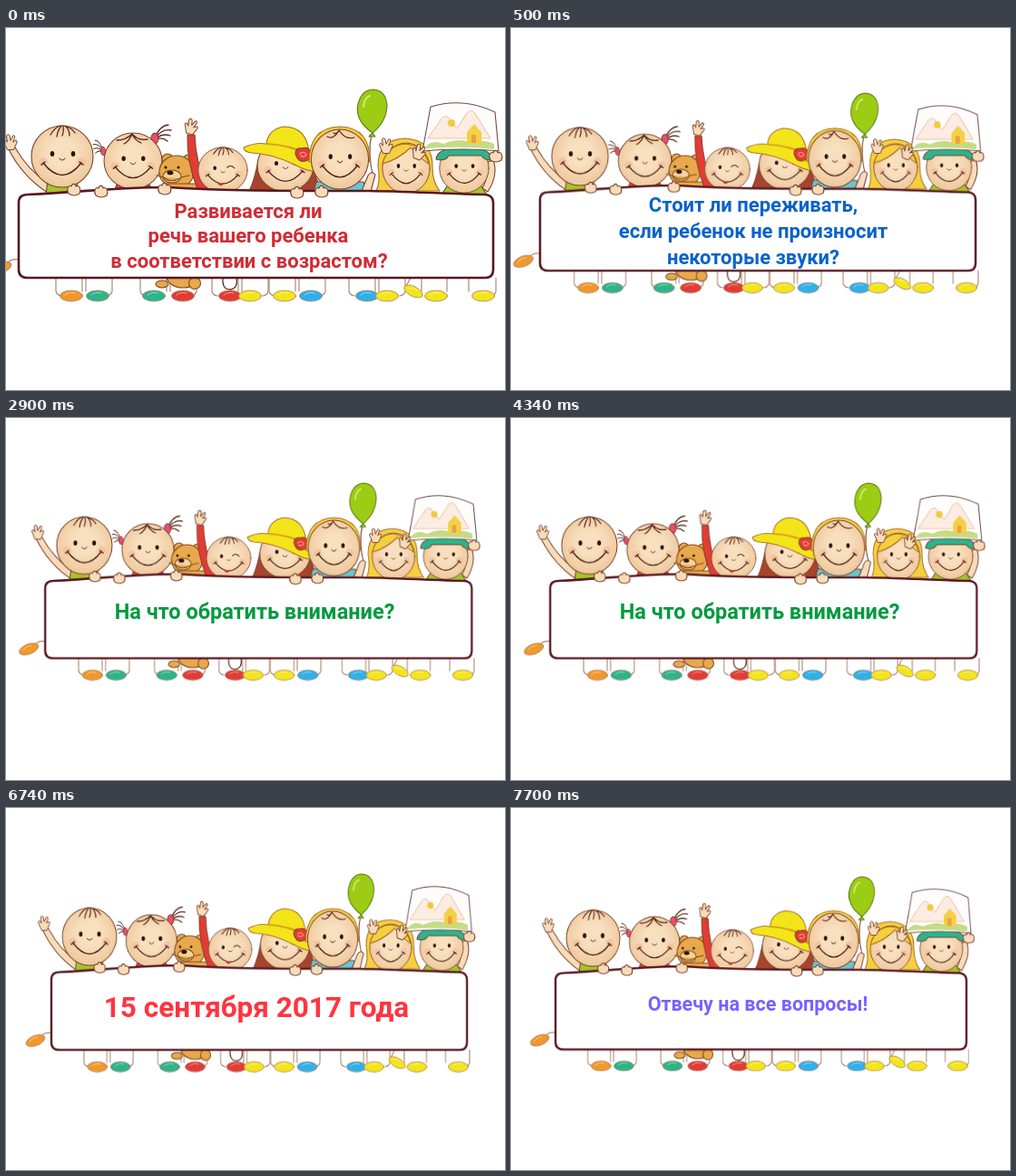
An HTML page without scripts for the animation above (8000 ms loop, 550 px wide and 400 px high).

```html
<!DOCTYPE html>
<html lang="ru">
<head>
<meta charset="utf-8">
<title>Речь ребенка</title>
<style>
html, body { margin: 0; width: 100%; height: 100%; overflow: hidden; background: #fff; }
svg { display: block; width: 100vw; height: 100vh; }
.scene { animation: shrink 8s step-end infinite; }
.captions { animation: turn 8s step-end infinite; }
/* hard cuts: the picture gets smaller with every caption */
@keyframes shrink {
  0% { transform: none; }
  6.25% { transform: matrix(.918, 0, 0, .943, 19.1, 7.9); }
  36.25% { transform: matrix(.899, 0, 0, .93, 30.6, 8.8); }
  66.25% { transform: matrix(.876, 0, 0, .934, 37.7, 9.5); }
  96.25% { transform: matrix(.866, 0, 0, .917, 36.9, 13.6); }
}
/* captions sit side by side, one stage width apart */
@keyframes turn {
  0% { transform: none; }
  6.25% { transform: translateX(-550px); }
  36.25% { transform: translateX(-1100px); }
  66.25% { transform: translateX(-1650px); }
  96.25% { transform: translateX(-2200px); }
}
.captions { font: 700 22px Roboto, "Open Sans", sans-serif; text-anchor: middle; }
.scene { stroke: #7a4430; stroke-width: 1.1; stroke-linecap: round; stroke-linejoin: round; fill: none; }
.skin { fill: #f8dcba; }
.dark { fill: #2c1410; stroke: none; }
.hair { stroke: #5c2a1c; stroke-width: 1.3; }
.blond { fill: #f6cf3e; stroke: #a8702a; }
.green { fill: #a4c42a; }
.red { fill: #e23c34; }
.yellow { fill: #f4e41a; }
.orange { fill: #f0982a; }
.teal { fill: #2cb48a; }
.blue { fill: #2eb0ea; }
.bear { fill: #e8a84c; stroke: #7c4a1c; }
.feet { stroke: #a8806a; }
</style>
</head>
<body>
<svg viewBox="0 0 550 400" preserveAspectRatio="none">
<defs>
  <radialGradient id="skin" cx=".5" cy=".45" r=".55">
    <stop offset=".4" stop-color="#f8dfbe"/>
    <stop offset="1" stop-color="#efc89c"/>
  </radialGradient>
  <g id="skull">
    <circle r="34" fill="url(#skin)"/>
    <g fill="#f2a88c" stroke="none" opacity=".4">
      <circle cx="-21" cy="6" r="5"/>
      <circle cx="21" cy="6" r="5"/>
    </g>
    <path d="M-3 2Q0 6 3 2"/>
    <path d="M-21 7Q0 34 21 7M-23 9L-19 6M19 6L23 9" stroke="#4c2418" stroke-width="1.5"/>
    <ellipse cx="-11" cy="-3" rx="2.3" ry="3" class="dark"/>
  </g>
  <g id="head">
    <use href="#skull"/>
    <ellipse cx="12" cy="-3" rx="2.3" ry="3" class="dark"/>
  </g>
  <g id="wink">
    <use href="#skull"/>
    <path d="M6-4Q11-9 16-3" stroke-width="1.7"/>
    <path d="M-8 18q5 9 9 2" class="red"/>
  </g>
  <path id="bangs" class="hair" d="M-3-34Q-9-31-13-24M-1-34Q-5-29-6-22M1-34Q2-28 0-23M3-34Q8-30 8-23M5-33Q11-31 14-26"/>
  <path id="hand" class="skin" d="M-6 4C-9-1-6-6-3-4C-2-8 2-7 2-4C6-6 8-1 6 4Q0 8-6 4Z"/>
  <path id="palm" class="skin" d="M-4 8L-7 1Q-10-4-6-4L-4-1L-5-9Q-3-12-1-9L0-3L3-9Q6-10 5-6L3-1Q8-5 8-1L4 8Z"/>
  <g id="shoe" stroke-width=".8">
    <ellipse rx="12.5" ry="6"/>
    <path d="M-7-1Q-2-5 4-3" stroke="#fff" stroke-opacity=".6"/>
  </g>
  <path id="legs" d="M-31 276V291Q-30 295-25 296M-2 276V291M2 276V291M31 276V291Q30 295 25 296"/>
  <g id="tail">
    <path class="hair" d="M0 0Q5-14 15-15M0 0Q8-11 18-9M1 0Q9-6 17-3M1 1Q8-2 14 3"/>
    <ellipse rx="4" ry="6" fill="#ee4c70"/>
  </g>
</defs>

<g class="scene">
  <g class="feet">
    <use href="#legs" x="86"/><use href="#legs" x="179"/>
    <use href="#legs" x="258"/><use href="#legs" x="321"/>
    <use href="#legs" x="409"/>
    <path d="M446 276L440 287M458 276V291M486 276V291M510 276V291M540 276V291Q539 295 535 296"/>
    <path d="M14 256Q4 254 0 262"/>
    <g class="bear">
      <ellipse cx="195" cy="274" rx="18" ry="13"/>
      <ellipse cx="172" cy="283" rx="7" ry="4"/>
      <circle cx="208" cy="282" r="6.5"/>
    </g>
    <path class="hair" d="M239 276Q238 289 247 289Q256 288 254 276"/>
    <use href="#shoe" class="orange" transform="translate(-6 265)rotate(-20)"/>
    <use href="#shoe" class="orange" x="72" y="296"/>
    <use href="#shoe" class="teal" x="101" y="296"/>
    <use href="#shoe" class="teal" x="163" y="296"/>
    <use href="#shoe" class="red" x="195" y="296"/>
    <use href="#shoe" class="red" x="247" y="296"/>
    <use href="#shoe" class="yellow" x="269" y="296"/>
    <use href="#shoe" class="yellow" x="307" y="296"/>
    <use href="#shoe" class="blue" x="336" y="296"/>
    <use href="#shoe" class="blue" x="398" y="296"/>
    <use href="#shoe" class="yellow" x="420" y="296"/>
    <use href="#shoe" class="yellow" transform="translate(449 291)rotate(28)scale(.9)"/>
    <use href="#shoe" class="yellow" x="474" y="296"/>
    <use href="#shoe" class="yellow" x="526" y="296"/>
  </g>

  <!-- waving boy -->
  <path class="skin" d="M3 134Q18 164 46 182L48 173Q24 157 10 132Z"/>
  <use href="#palm" transform="translate(5 127)scale(.9)"/>
  <path class="green" d="M46 168L44 184H80L78 168Z"/>
  <use href="#head" x="62" y="142"/>
  <use href="#bangs" x="62" y="142"/>

  <!-- girl with pigtails -->
  <use href="#tail" transform="translate(164 122)"/>
  <use href="#tail" transform="translate(107 136)scale(-.6 .8)"/>
  <path class="red" d="M122 173L118 184H164L158 173Z"/>
  <use href="#head" transform="translate(140 147)scale(.94 .91)"/>
  <path class="hair" d="M139 117Q132 124 122 124M139 117Q136 125 130 128M139 117Q146 125 156 123M139 117Q142 124 149 127"/>

  <!-- bear -->
  <g class="bear">
    <circle cx="178" cy="145" r="6"/>
    <circle cx="201" cy="146" r="6"/>
    <ellipse cx="188" cy="159" rx="19" ry="18"/>
    <path d="M174 172H212V182H174Z"/>
    <ellipse cx="183" cy="164" rx="10" ry="7" fill="#f6d49a"/>
    <ellipse cx="181" cy="160" rx="3.5" ry="2.3" class="dark"/>
    <circle cx="176" cy="154" r="1.5" class="dark"/>
    <circle cx="190" cy="154" r="1.5" class="dark"/>
    <path d="M174 165Q182 172 191 166M166 163L174 165M193 165L202 163"/>
  </g>

  <!-- winking boy -->
  <path class="red" d="M200 118Q199 148 211 178H222Q209 148 208 118Z"/>
  <use href="#palm" transform="translate(204 110)rotate(15)scale(.9)"/>
  <use href="#wink" transform="translate(239 157)scale(.8 .74)"/>
  <use href="#bangs" transform="translate(239 157)scale(.8 .74)"/>

  <!-- girl in a hat -->
  <path d="M278 146Q274 168 268 180H350Q340 168 338 148Z" fill="#a8442c"/>
  <use href="#head" transform="translate(308 152)scale(.91 .85)"/>
  <path class="yellow" d="M262 132Q275 126 287 128Q289 112 306 109Q331 109 334 137Q349 148 352 156Q341 163 318 151Q294 139 271 138Q262 137 262 132Z" stroke="#a8702a"/>
  <path d="M287 128Q312 129 334 140" stroke="#d8a01c" stroke-width="2"/>
  <path class="red" d="M319 139Q319 132 326 133Q334 130 336 138Q338 146 330 147Q322 149 319 139Z"/>
  <path d="M324 139Q328 135 331 140Q328 144 325 141" stroke="#ffb09c"/>

  <!-- balloon and its owner -->
  <path d="M403 117Q398 138 405 166"/>
  <path d="M404 116Q384 102 388 84Q392 68 405 68Q419 69 420 86Q419 104 404 116L407 120H400Z" fill="#9ccc14" stroke="#5c7c14"/>
  <path d="M394 87Q395 77 401 75" stroke="#d4ec70" stroke-width="2"/>
  <path class="blond" d="M334 148Q334 110 368 109Q402 110 401 148Z"/>
  <path d="M342 170L338 184H400L394 170Z" fill="#6cc4cc"/>
  <use href="#head" transform="translate(368 145)scale(.93 .97)"/>
  <path class="hair" d="M354 120Q361 124 367 113Q374 124 384 121M361 116Q364 118 367 113"/>
  <path class="skin" d="M392 180L399 163Q403 157 407 162L402 181Z"/>

  <!-- blond girl -->
  <path class="blond" d="M410 152Q410 123 440 122Q471 124 470 154Q470 170 478 180H408Q413 170 410 152Z"/>
  <use href="#head" transform="translate(441 155)scale(.77 .82)"/>
  <path class="blond" d="M415 150Q420 130 440 128Q461 130 466 150Q456 144 446 132Q433 145 415 150Z"/>
  <use href="#palm" transform="translate(419 131)scale(.9)"/>

  <!-- boy with a picture -->
  <path class="skin" d="M537 146Q543 162 531 181L525 177Q533 162 531 148Z"/>
  <path class="green" d="M488 172L480 184H530L522 172Z"/>
  <use href="#head" transform="translate(505 155)scale(.8)"/>
  <path class="teal" d="M474 145Q475 132 505 131Q535 132 536 146Q528 147 524 141H488Q484 148 474 145Z"/>
  <path d="M468 87Q504 76 539 93L543 136Q500 132 459 136Z" fill="#fffdfc" stroke="#6c4c4c"/>
  <g stroke="none">
    <path d="M465 122L480 100Q485 94 490 102L497 111L508 94Q513 88 518 96L534 122Z" fill="#fcece2" stroke="#ecc8b0"/>
    <circle cx="491" cy="105" r="4" fill="#f4c83c"/>
    <path d="M463 131Q470 123 482 128Q498 121 510 126Q526 122 538 128L538 134Q500 130 463 133Z" fill="#c4dc84"/>
    <path d="M508 127V115L516 106L524 115V128Z" fill="#f4d044"/>
    <path d="M513 127V118H518V127Z" fill="#eca044"/>
  </g>
  <use href="#palm" transform="translate(455 138)rotate(20)scale(.9)"/>
  <use href="#hand" x="540" y="142"/>

  <!-- board -->
  <path d="M14 193Q14 184 24 184C90 181 120 176 178 176C240 180 300 180 400 180C460 181 500 184 528 184Q537 185 537 193V267Q537 276 528 276H24Q14 276 14 267Z" fill="#fff" stroke="#581820" stroke-width="2.6"/>
  <use href="#hand" x="75" y="179"/>
  <use href="#hand" x="105" y="181"/>
  <use href="#hand" x="175" y="178"/>
  <use href="#hand" x="321" y="182"/>
  <use href="#hand" x="348" y="181"/>
</g>

<g class="captions">
  <g fill="#d02c34">
    <text x="267" y="210">Развивается ли</text>
    <text x="267" y="237">речь вашего ребенка</text>
    <text x="268" y="265">в соответствии с возрастом?</text>
  </g>
  <g fill="#0a62cc" transform="translate(550)">
    <text x="267" y="203">Стоит ли переживать,</text>
    <text x="267" y="232">если ребенок не произносит</text>
    <text x="267" y="261">некоторые звуки?</text>
  </g>
  <text x="1374" y="222" fill="#009a3e" font-size="23.5">На что обратить внимание?</text>
  <text x="1926" y="231" fill="#ff3440" font-size="31.5">15 сентября 2017 года</text>
  <text x="2472" y="224" fill="#7a60ff" font-size="21.5">Отвечу на все вопросы!</text>
</g>
</svg>
</body>
</html>
```
